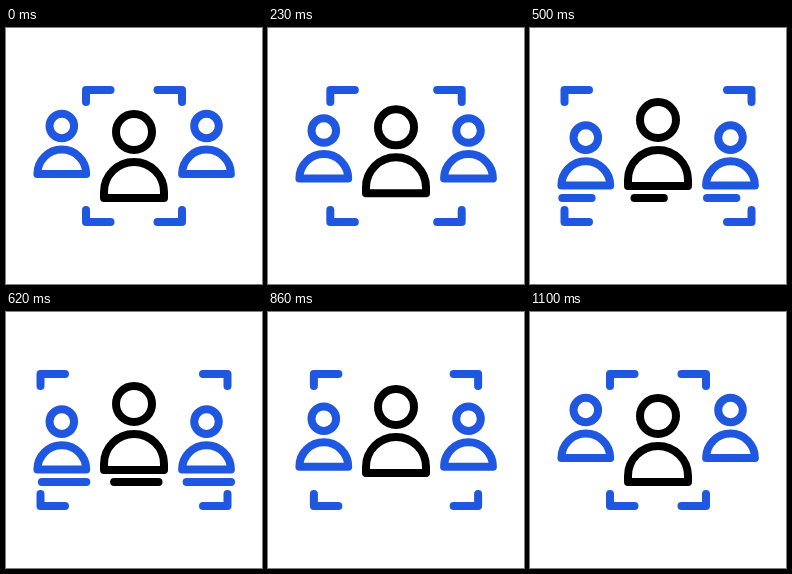
An HTML page with a canvas that plays this animation: 256x256 px, repeating every 1.16 s.

```html
<!DOCTYPE html>
<html lang="en">
<head>
<meta charset="utf-8">
<title>Focus group</title>
<style>
html, body { margin: 0; height: 100%; overflow: hidden; background: #fff; }
canvas { display: block; width: 100vw; height: 100vh; }
</style>
</head>
<body>
<canvas width="256" height="256"></canvas>
<script>
const ctx = document.querySelector('canvas').getContext('2d');
const BLUE = '#1f57e0', BLACK = '#000';
const LOOP = 1160, START = 170, STEP = 30, END = 1100;

// Eased progress from 0 to 1 between two times
function ease(t, from, to) {
  const p = Math.min(1, Math.max(0, (t - from) / (to - from)));
  return (1 - Math.cos(Math.PI * p)) / 2;
}

function stroke(color, trace) {
  ctx.strokeStyle = color;
  ctx.beginPath();
  trace();
  ctx.stroke();
}

// A ring for the head and a dome of the given radius standing on straight sides
function person(x, base, color, headGap, headRadius, radius, side) {
  stroke(color, () => ctx.arc(x, base - headGap, headRadius, 0, 2 * Math.PI));
  stroke(color, () => {
    ctx.moveTo(x - radius, base);
    ctx.arc(x, base - side, radius, Math.PI, 2 * Math.PI);
    ctx.lineTo(x + radius, base);
    ctx.closePath();
  });
}

function corner(x, y, dx, dy) {
  stroke(BLUE, () => {
    ctx.moveTo(x + dx * 24.5, y);
    ctx.lineTo(x, y);
    ctx.lineTo(x, y + dy * 12);
  });
}

function underline(x, color, from, to) {
  if (to - from < 0.005) return;
  stroke(color, () => {
    ctx.moveTo(x - 23.5 + 48 * from, 170);
    ctx.lineTo(x - 23.5 + 48 * to, 170);
  });
}

function draw(t) {
  const open = ease(t, 140, 350) - ease(t, 740, 1100);
  const drawn = ease(t, 380, 590), erased = ease(t, 590, 760);

  ctx.fillStyle = '#fff';
  ctx.fillRect(0, 0, 256, 256);
  ctx.lineWidth = 8;
  ctx.lineCap = ctx.lineJoin = 'round';

  for (const side of [-1, 1]) {
    const x = 128 + side * (48 + 45.5 * open);
    corner(x, 62, -side, 1);
    corner(x, 194, -side, -1);
  }
  for (const x of [55.8, 200.5]) {
    person(x, 146 + 11.6 * open, BLUE, 48, 12.3, 24.4, 0);
    underline(x, BLUE, erased, drawn);
  }
  person(128, 170 - 12 * open, BLACK, 66, 18, 30, 6);
  underline(128, BLACK, erased, drawn);
}

function frame() {
  const t = performance.now() % LOOP;
  // The motion advances in even steps after the opening hold
  const step = Math.floor((t - START) / STEP);
  draw(t < START ? 0 : Math.min(END, START + step * STEP));
  requestAnimationFrame(frame);
}
frame();
</script>
</body>
</html>
```
